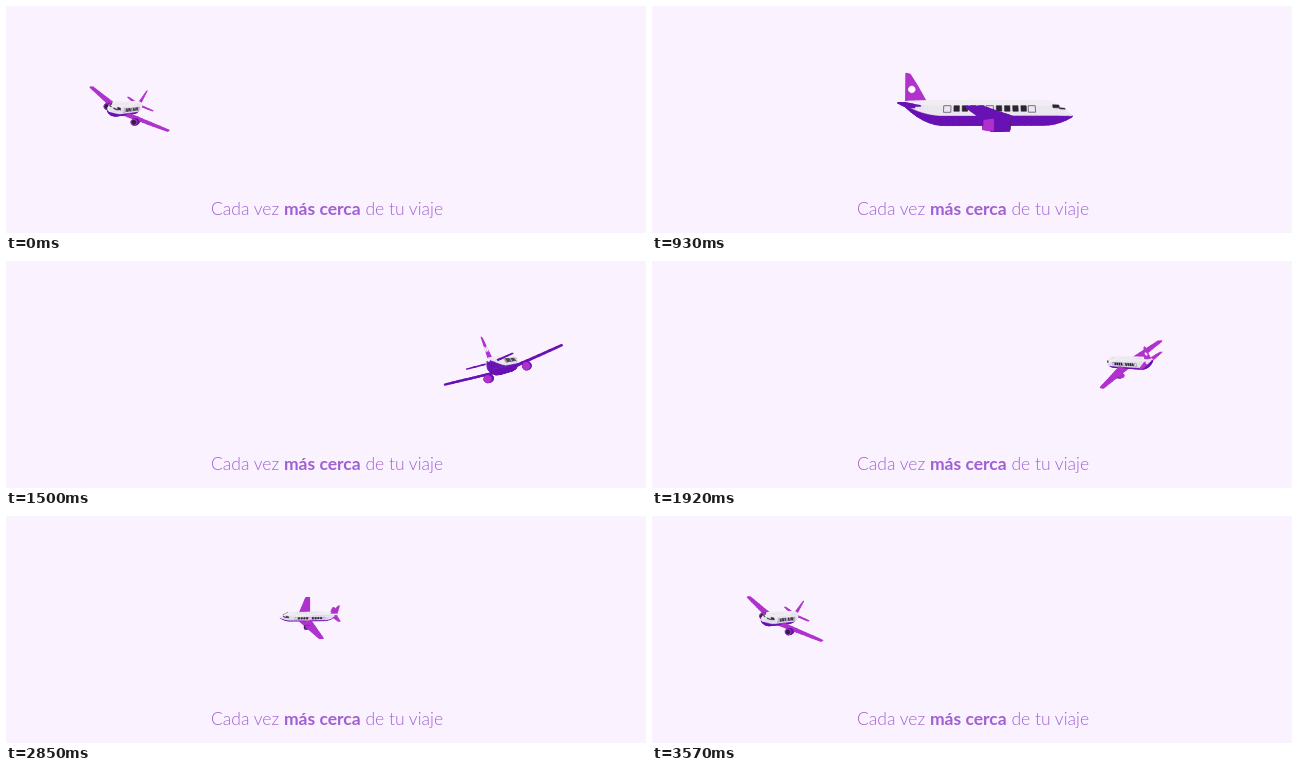
Write an HTML page with a canvas that moves like this. It is 640x227 px and loops after 3600 ms.

```html
<!DOCTYPE html>
<html lang="es">
<head>
<meta charset="utf-8">
<style>
html, body { margin: 0; width: 100%; height: 100%; overflow: hidden; background: #faf3ff; }
canvas { position: absolute; left: 0; top: 0; width: 640px; height: 227px; }
p {
  position: absolute; left: 1px; top: 191px; width: 640px; margin: 0;
  font: 300 17.5px/24px Lato, sans-serif; text-align: center; white-space: nowrap; color: #a05fd2;
}
b { font-weight: 700; }
</style>
</head>
<body>
<canvas width="640" height="227"></canvas>
<p>Cada vez <b>más cerca</b> de tu viaje</p>
<script>
const ctx = document.querySelector('canvas').getContext('2d');
const { sin, cos, PI, sqrt, max, min } = Math;
const LOOP = 3600, STEP = 30, TURN = 1760, LEFT = 120, RIGHT = 519;
const RAD = PI / 180, CAMERA = 350, ELEVATION = 2 * RAD;
const WHITE = '#ebe7ef', DARK = '#6812b4', BRIGHT = '#b032cc', BLACK = '#2b2533';

// Eased run to the right in front, then a run back to the left in the distance
function travel(t) {
  if (t < TURN) return (1 - cos(PI * t / TURN)) / 2;
  const k = (t - TURN) / (LOOP - TURN);
  return 1 - k - 0.05 * sin(2 * PI * k) + 0.025 * sin(PI * k);
}

function poseAt(t) {
  const wave = shift => 1 - cos(2 * PI * (t - shift) / LOOP);
  const scale = 1 / (1 + 0.95 * wave(890));
  const heading = (250 + t / 10 + 22 * wave(100)) * RAD;
  return {
    x: LEFT + (RIGHT - LEFT) * travel(t),
    y: 97 + 10.5 * scale,
    scale,
    heading,
    bank: (22 - 17 * cos(heading)) * RAD
  };
}

// Model axes: u forward, v to the left wing, w up
const faces = [];
const add = (pts, color, opts = {}) => faces.push({ pts, color, bias: 0, line: 0.4, ...opts });

function section(u) {
  const nose = max(0, (u - 55) / 29), tail = max(0, (-45 - u) / 39);
  const top = 13 - 15 * nose ** 2 - tail ** 3;
  const bottom = -12 + 8.5 * nose ** 2 + 19 * tail ** 2;
  return { mid: (top + bottom) / 2, r: (top - bottom) / 2, stripe: -2.5 + 11.5 * tail ** 2 };
}

function ring(u) {
  const { mid, r, stripe } = section(u);
  const edge = Math.asin(max(-0.9, min(0.9, (stripe - mid) / r)));
  return Array.from({ length: 17 }, (_, i) => {
    const a = i <= 10
      ? edge + (PI - 2 * edge) * i / 10
      : PI - edge + (PI + 2 * edge) * (i - 10) / 6;
    return [u, r * cos(a), mid + r * sin(a)];
  });
}

function fuselage() {
  for (let u = -84; u < 84; u += 6) {
    const p = ring(u), q = ring(u + 6);
    for (let i = 0; i < 16; i++) {
      const color = i > 9 ? DARK : i > 1 && i < 8 ? '#f0edf3' : WHITE;
      add([p[i], p[i + 1], q[i + 1], q[i]], color);
    }
  }
}

function pane(side, u0, u1, w0, w1, color, opts) {
  const at = (u, w) => {
    const { mid, r } = section(u);
    return [u, side * (sqrt(max(0, r * r - (w - mid) ** 2)) + 0.4), w];
  };
  add([at(u0, w0), at(u1, w0), at(u1, w1), at(u0, w1)], color, { bias: 5, ...opts });
}

// Each end of a panel: leading edge, trailing edge, sideways, height
function panel(side, root, tip, parts, line) {
  const mix = k => root.map((v, i) => v + (tip[i] - v) * k);
  for (let i = 0; i < parts; i++) {
    const a = mix(i / parts), b = mix((i + 1) / parts);
    add([[a[0], side * a[2], a[3]], [b[0], side * b[2], b[3]],
      [b[1], side * b[2], b[3]], [a[1], side * a[2], a[3]]], BRIGHT, { under: DARK, line });
  }
}

function disc(u, v, w, r) {
  return Array.from({ length: 13 }, (_, i) =>
    [u, v + r * cos(i * PI / 6), w + r * sin(i * PI / 6)]);
}

function tube(u0, u1, v, w, r0, r1, color) {
  const a = disc(u0, v, w, r0), b = disc(u1, v, w, r1);
  for (let i = 0; i < 12; i++) add([a[i], a[i + 1], b[i + 1], b[i]], color);
  add(a, color);
  add(b, color);
}

function engine(v) {
  tube(-6, 3, v, -12, 4, 5.5, BRIGHT);
  tube(3, 17, v, -12, 6, 6, DARK);
  add(disc(17.2, v, -12, 6), '#b83bd3', { bias: 1 });
  add(disc(17.6, v, -12, 4.4), BLACK, { bias: 2 });
}

fuselage();
for (const side of [-1, 1]) {
  for (let u = -41; u < 50; u += 41) pane(side, u - 3.5, u + 3.5, 0.5, 7, WHITE, { edge: '#77717f' });
  for (let i = 0; i < 8; i++) {
    const u = (i < 4 ? -32 : -23) + i * 8;
    pane(side, u - 2.6, u + 2.6, 1.5, 7, BLACK);
  }
  pane(side, 62, 69, 5, 8, BLACK);
  pane(side, 69, 76, 4, 5, BLACK);
  panel(side, [30, -4, 9, -7], [-9, -20, 90, 0], 9, 3.2);
  panel(side, [-62, -81, 3, 6], [-77, -84, 31, 8], 3, 1.6);
  engine(side * 31);
  add(disc(0, -77, 24, 3.4).map(([, u, w]) => [u, side * 1.2, w]), '#fff', { bias: 0.6 });
}
add([[-63, 0, 12], [-72, 0, 28], [-79, 0, 39], [-83, 0, 40], [-83, 0, 12]], BRIGHT, { line: 1.4 });

function draw(t) {
  const pose = poseAt(t), { scale } = pose;
  const c = cos(pose.heading), s = sin(pose.heading);
  const cb = cos(pose.bank), sb = sin(pose.bank);
  const ce = cos(ELEVATION), se = sin(ELEVATION);

  const project = ([u, v, w]) => {
    const x = u * c - v * s * cb - w * s * sb;
    const y = w * cb - v * sb;
    const z = -u * s - v * c * cb - w * c * sb;
    const depth = z * ce + y * se;
    const size = scale / (1 - depth * scale / CAMERA);
    return [pose.x + x * size, pose.y - (y * ce - z * se) * size, depth];
  };
  const topVisible = project([0, 0, 1])[2] > 0;

  ctx.clearRect(0, 0, 640, 227);
  ctx.lineJoin = 'round';
  const sorted = faces.map(f => {
    const pts = f.pts.map(project);
    return { f, pts, depth: pts.reduce((sum, p) => sum + p[2], 0) / pts.length + f.bias };
  }).sort((a, b) => a.depth - b.depth);

  for (const { f, pts } of sorted) {
    const color = f.under && !topVisible ? f.under : f.color;
    ctx.beginPath();
    pts.forEach(p => ctx.lineTo(p[0], p[1]));
    ctx.closePath();
    ctx.fillStyle = color;
    ctx.strokeStyle = f.edge || color;
    ctx.lineWidth = f.edge ? scale : f.line * scale + 0.2;
    ctx.fill();
    ctx.stroke();
  }
}

const start = performance.now();
function tick() {
  const t = (performance.now() - start) % LOOP;
  draw(Math.floor(t / STEP) * STEP);
  requestAnimationFrame(tick);
}
tick();
</script>
</body>
</html>
```
